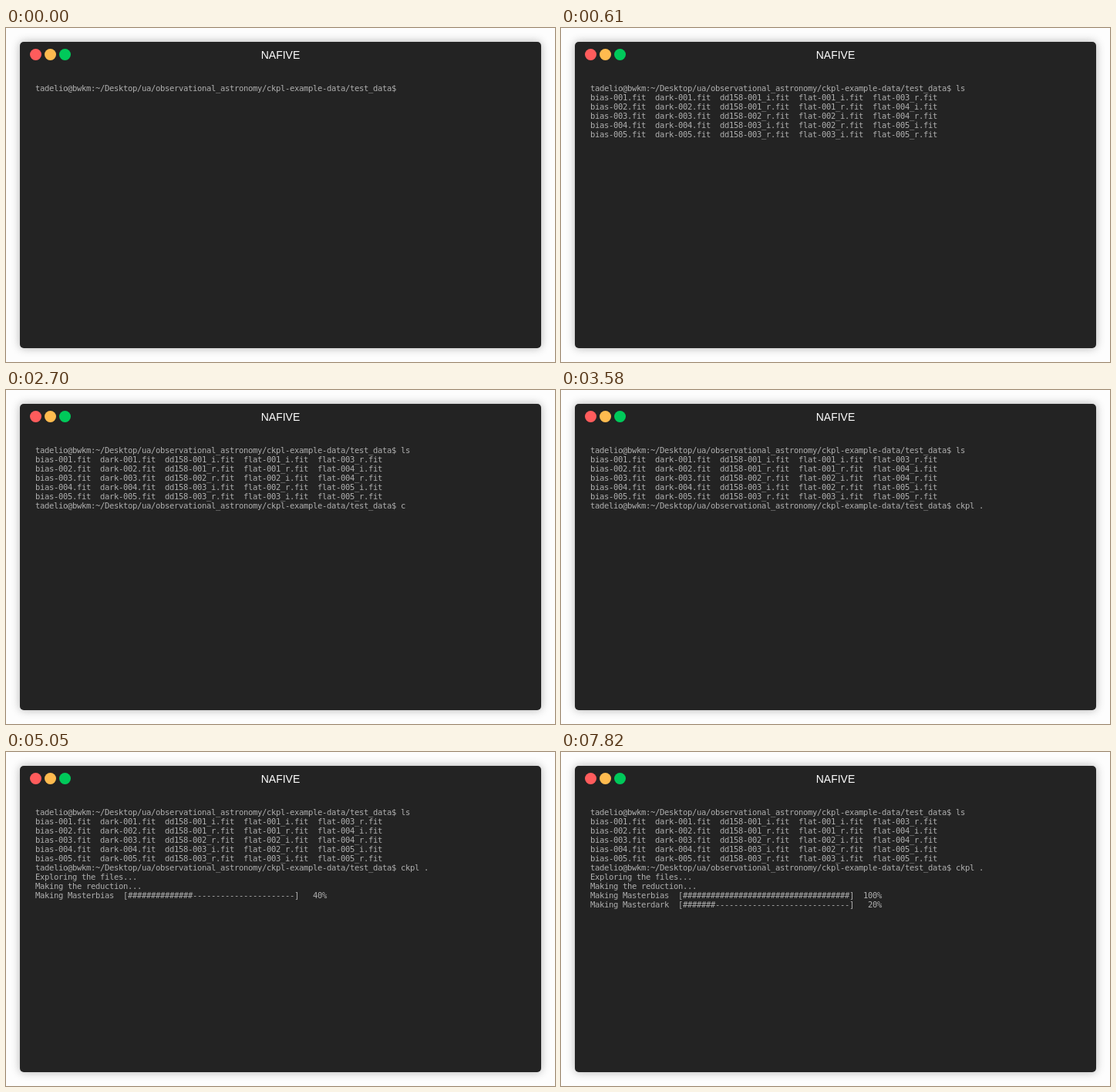
Recreate the animation shown at these times as an HTML page. Size 712x434 px, loop 8000 ms.

```html
<!DOCTYPE html>
<html lang="en">
<head>
<meta charset="utf-8">
<title>Terminal</title>
<style>
  html, body { margin: 0; width: 100%; height: 100%; overflow: hidden; background: #fdfdfd; }
  #window {
    position: absolute; left: 18px; top: 18px; width: 676px; height: 398px;
    border-radius: 5px; background: #232323; box-shadow: 0 0 12px rgba(0, 0, 0, .3);
  }
  #window i { position: absolute; top: 9px; width: 15px; height: 15px; border-radius: 50%; }
  #title {
    position: absolute; top: 8px; width: 100%; text-align: center; color: #fff;
    font: 14px/18px "Liberation Sans", Arial, sans-serif;
  }
  #screen {
    position: absolute; left: 20px; top: 54px; margin: 0; color: #afafaf;
    font: 10.5px/12px "DejaVu Sans Mono", monospace; letter-spacing: -.3214px;
    font-variant-ligatures: none;
  }
</style>
</head>
<body>
<div id="window">
  <i style="left:13px;background:#ff5c5c"></i>
  <i style="left:32px;background:#ffbb4f"></i>
  <i style="left:51px;background:#00c95a"></i>
  <div id="title">NAFIVE</div>
  <pre id="screen"></pre>
</div>
<script>
const LOOP = 8000;
const PROMPT = 'tadelio@bwkm:~/Desktop/ua/observational_astronomy/ckpl-example-data/test_data$ ';
const objects = ['001_i', '001_r', '002_r', '003_i', '003_r'];
const flats = [1, 2, 3, 4, 5].flatMap(n => [`00${n}_i`, `00${n}_r`]);

const listing = objects.map((object, i) => [
  `bias-00${i + 1}`, `dark-00${i + 1}`, `dd158-${object}`,
  `flat-${flats[i]}`, `flat-${flats[i + 5]}`
].map(name => name + '.fit').join('  ')).join('\n');

// Each key is [time, text]; its text shows from that time on.
const typed = (keys, t) => keys.filter(([at]) => t >= at).map(([, text]) => text).join('');

// Each time in steps advances the bar by 20 %, starting at 0 %.
function bar(label, steps, t, eta = '') {
  const done = steps.filter(at => t >= at).length - 1;
  if (done < 0) return '';
  const filled = Math.floor(36 * done / 5);
  const percent = `${done * 20}%`.padStart(4);
  return `${label}  [${'#'.repeat(filled).padEnd(36, '-')}]  ${percent}${done === 4 ? eta : ''}\n`;
}

const session = [
  [0, PROMPT], [300, 'l'], [360, 's'], [610, '\n' + listing + '\n'],
  [710, PROMPT], [2700, 'c'], [2800, 'k'], [3120, 'p'], [3170, 'l'], [3580, ' .'],
  [4720, '\nExploring the files...\n'], [4760, 'Making the reduction...\n']
];

const screen = document.getElementById('screen');
let shown;

function draw(now) {
  const t = now % LOOP;
  const text = typed(session, t)
    + bar('Making Masterbias', [4760, 4850, 5050, 5390, 5770, 6230], t, '  0d 00:00:01')
    + bar('Making Masterdark', [7660, 7820], t);
  if (text !== shown) screen.textContent = shown = text;
}

let start;
function tick(now) {
  start ??= now;
  draw(now - start);
  requestAnimationFrame(tick);
}
draw(0);
requestAnimationFrame(tick);
</script>
</body>
</html>
```
